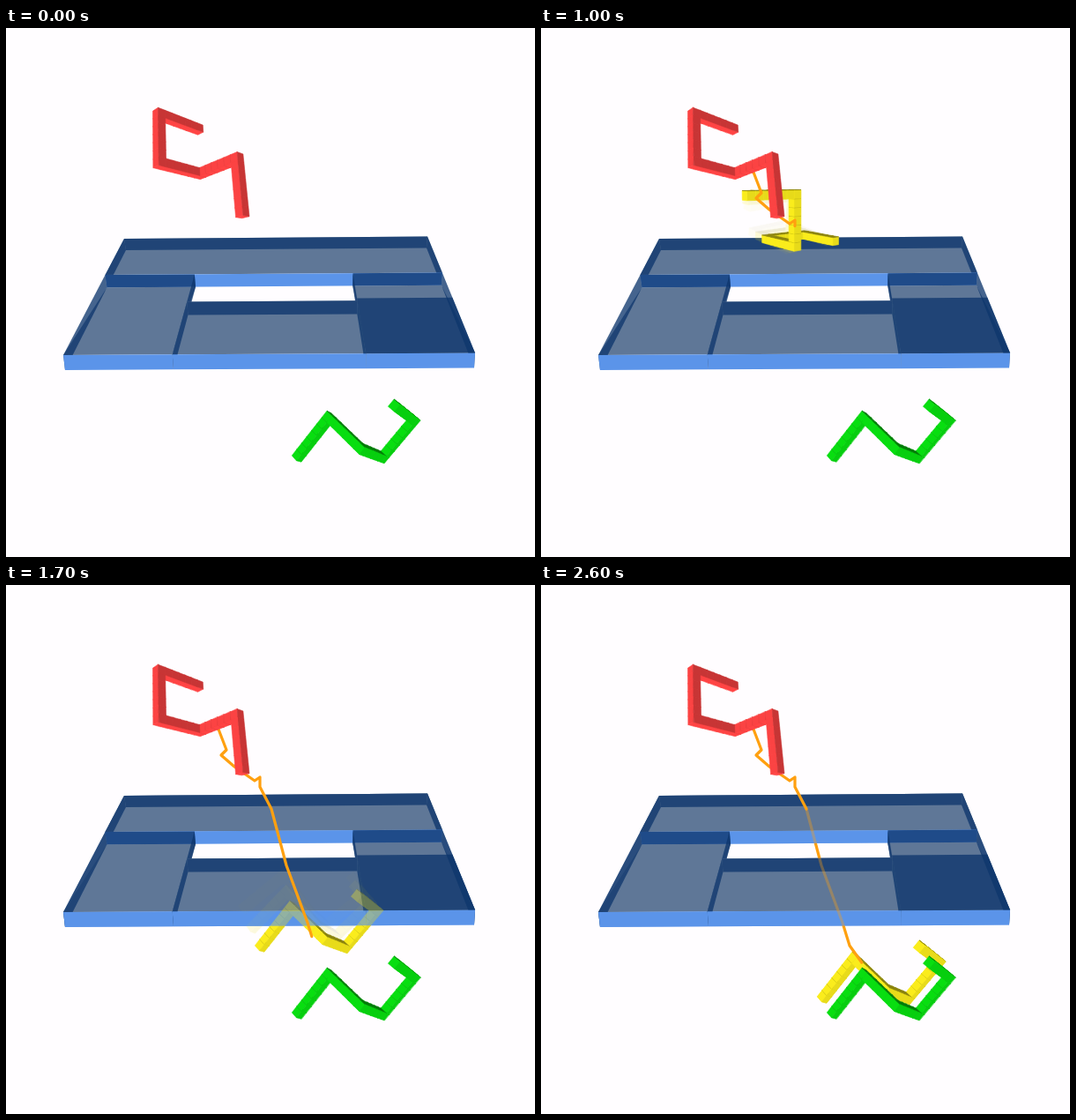
An HTML page with a canvas that plays this animation: 600x600 px, repeating every 2700 ms.

```html
<!DOCTYPE html>
<html>
<head>
<meta charset="utf-8">
<style>
html, body { margin: 0; width: 100%; height: 100%; overflow: hidden; background: #fffdff; }
canvas { display: block; }
</style>
</head>
<body>
<canvas id="stage" width="600" height="600"></canvas>
<script>
const SIZE = 600, LOOP = 2700, STEP = 100;
const ctx = document.getElementById('stage').getContext('2d');

function makeLayer() {
  const canvas = document.createElement('canvas');
  canvas.width = canvas.height = SIZE;
  return canvas.getContext('2d');
}
const plateLayer = makeLayer(), ghostLayer = makeLayer();

const mix = (a, b, u) => a + (b - a) * u;
const mixAll = (a, b, u) => a.map((v, i) => mix(v, b[i], u));
const dot = (a, b) => a[0] * b[0] + a[1] * b[1] + a[2] * b[2];
const cross = (a, b) => [0, 1, 2].map(i => {
  const j = (i + 1) % 3, k = (i + 2) % 3;
  return a[j] * b[k] - a[k] * b[j];
});
const unit = a => a.map(v => v / Math.hypot(...a));

function fillPoly(c, pts, color) {
  c.beginPath();
  pts.forEach(([x, y]) => c.lineTo(x, y));
  c.closePath();
  c.fillStyle = color;
  c.fill();
}

// ---- Plate: four glass boxes around a rectangular hole ----
const FAR_NEAR = 0.737;
const HOLE = { left: 0.265, right: 0.735, back: 0.38, front: 0.62 };
const FLOOR = '#5f7797', WALL = 'rgba(13,54,108,0.77)', FRONT = '#5b94e9';

// u runs left to right, v back to front, level from top (0) to bottom (1).
function platePoint([u, v, level]) {
  const f = FAR_NEAR * v / (1 - (1 - FAR_NEAR) * v);
  const left = mix(134, 65, f) + 2 * level;
  const right = mix(478, 532, f) - level;
  return [mix(left, right, u), mix(239, 371, f) + level * mix(13, 17, f) - 2.5 * u];
}

function drawBox(u0, u1, v0, v1) {
  const quad = (color, ...corners) => fillPoly(plateLayer, corners.map(platePoint), color);
  const across = (v, color) => quad(color, [u0, v, 0], [u1, v, 0], [u1, v, 1], [u0, v, 1]);
  const along = u => quad(WALL, [u, v0, 0], [u, v1, 0], [u, v1, 1], [u, v0, 1]);
  if (v0 !== HOLE.back) quad(FLOOR, [u0, v0, 0], [u1, v0, 0], [u1, v1, 0], [u0, v1, 0]);
  else quad(FLOOR, [u0, v0, 1], [u1, v0, 1], [u1, v1, 0], [u0, v1, 0]);
  across(v0, WALL);
  along(u0);
  along(u1);
  across(v1, FRONT);
}

drawBox(0, 1, 0, HOLE.back);
drawBox(0, HOLE.left, HOLE.back, 1);
drawBox(HOLE.right, 1, HOLE.back, 1);
drawBox(HOLE.left, HOLE.right, HOLE.front, 1);
fillPoly(plateLayer, [[HOLE.right, 0.6, 0], [1, 0.6, 0], [1, 1, 0], [HOLE.right, 1, 0]].map(platePoint), WALL);

// ---- Bar: a rigid chain of cubes with right-angled bends ----
const UNIT = 59, PER_ARM = 6, HALF = 0.5 / PER_ARM, CAMERA = 400;
const LIGHT = unit([-0.3, 0.5, -0.8]);
const AXES = [[1, 0, 0], [0, 1, 0], [0, 0, 1]];
const add = (p, axis, amount) => p.map((v, i) => v + AXES[axis][i] * amount);

const cubes = [[0, -1, -0.5]];
for (const [axis, sign] of [[0, -1], [1, 1], [0, 1], [2, 1], [1, 1]])
  for (let i = 0; i < PER_ARM; i++)
    cubes.push(add(cubes[cubes.length - 1], axis, sign / PER_ARM));

// Each orientation gives the body axes along screen x and screen y.
const RED_TURN = { right: [41, 4, 42], down: [11, 57, -19] };
const GREEN_TURN = { right: [-29, -37, -37], down: [-14, 46, -38] };
const turns = [
  { t: 0, ...RED_TURN },
  { t: 600, right: [48, -8, 24], down: [11, 50, -27] },
  { t: 1000, right: [38, -51, 0], down: [4, 5, -55] },
  { t: 1300, right: [13, -55, -3], down: [-26, 0, -50] },
  { t: 1700, ...GREEN_TURN }
];

function drawBar(c, [cx, cy], turn, rgb) {
  const right = unit(turn.right);
  const lean = dot(turn.down, right);
  const down = unit(turn.down.map((v, i) => v - lean * right[i]));
  const depth = cross(down, right);
  const project = p => {
    const k = UNIT / (1 + UNIT * dot(depth, p) / CAMERA);
    return [cx + k * dot(right, p), cy + k * dot(down, p)];
  };
  const faces = AXES.map((_, axis) => {
    const sign = depth[axis] < 0 ? 1 : -1;
    const lit = sign * dot([right[axis], down[axis], depth[axis]], LIGHT);
    const shade = Math.min(1, Math.max(0.35, 0.72 + 0.4 * lit));
    return { axis, sign, color: `rgb(${rgb.map(v => Math.round(v * shade))})` };
  });
  c.lineWidth = 0.6;
  c.lineJoin = 'round';
  for (const cube of [...cubes].sort((a, b) => dot(depth, b) - dot(depth, a))) {
    for (const { axis, sign, color } of faces) {
      const middle = add(cube, axis, sign * HALF);
      const corners = [[-1, -1], [1, -1], [1, 1], [-1, 1]].map(([a, b]) =>
        project(add(add(middle, (axis + 1) % 3, a * HALF), (axis + 2) % 3, b * HALF)));
      fillPoly(c, corners, color);
      c.strokeStyle = color;
      c.stroke();
    }
  }
}

// ---- Motion: the bar's centre follows the trail ----
const waypoints = [
  [0, 240, 161], [400, 250, 187], [600, 244, 193], [750, 259, 206],
  [900, 282, 222], [1000, 288, 218], [1100, 288, 229], [1300, 301, 254],
  [1500, 318, 318], [1700, 342, 383], [1800, 350, 409], [1900, 373, 441]
].map(([t, x, y]) => ({ t, point: [x, y] }));

function between(keys, t) {
  let i = 0;
  while (i < keys.length - 2 && t > keys[i + 1].t) i++;
  const [a, b] = [keys[i], keys[i + 1]];
  return [a, b, Math.min(1, Math.max(0, (t - a.t) / (b.t - a.t)))];
}
function centreAt(t) {
  const [a, b, u] = between(waypoints, t);
  return mixAll(a.point, b.point, u);
}
function turnAt(t) {
  const [a, b, u] = between(turns, t);
  return { right: mixAll(a.right, b.right, u), down: mixAll(a.down, b.down, u) };
}

function drawMover(t, alpha) {
  ghostLayer.clearRect(0, 0, SIZE, SIZE);
  drawBar(ghostLayer, centreAt(t), turnAt(t), [250, 236, 28]);
  ctx.globalAlpha = alpha;
  ctx.drawImage(ghostLayer.canvas, 0, 0);
  ctx.globalAlpha = 1;
}

function drawTrail(from, to) {
  if (to <= from) return;
  const inner = waypoints.filter(w => w.t > from && w.t < to).map(w => w.point);
  ctx.beginPath();
  [centreAt(from), ...inner, centreAt(to)].forEach(([x, y]) => ctx.lineTo(x, y));
  ctx.lineJoin = ctx.lineCap = 'round';
  ctx.strokeStyle = '#ffa010';
  ctx.lineWidth = 3.2;
  ctx.stroke();
}

function draw(t) {
  const tip = Math.min(t + 60, 1860), passing = 1300;
  const below = t >= 1500, settled = t >= 1900;
  ctx.fillStyle = '#fffdff';
  ctx.fillRect(0, 0, SIZE, SIZE);
  ctx.drawImage(plateLayer.canvas, 0, 0);
  if (t > 0) {
    const strength = settled ? 0.7 : 0.14;
    drawMover(t - 100, strength * 0.3);
    drawMover(t - 50, strength);
    drawMover(t, 1);
    if (settled) drawTrail(passing, tip);
    if (below) {
      ctx.globalAlpha = 0.65;
      ctx.drawImage(plateLayer.canvas, 0, 0);
      ctx.globalAlpha = 1;
    }
    drawTrail(0, settled ? passing : tip);
  }
  drawBar(ctx, [240, 157], RED_TURN, [255, 68, 68]);
  drawBar(ctx, [384, 459], GREEN_TURN, [8, 222, 16]);
}

const start = performance.now();
function tick() {
  const t = (performance.now() - start) % LOOP;
  draw(Math.floor(t / STEP) * STEP);
  requestAnimationFrame(tick);
}
tick();
</script>
</body>
</html>
```
